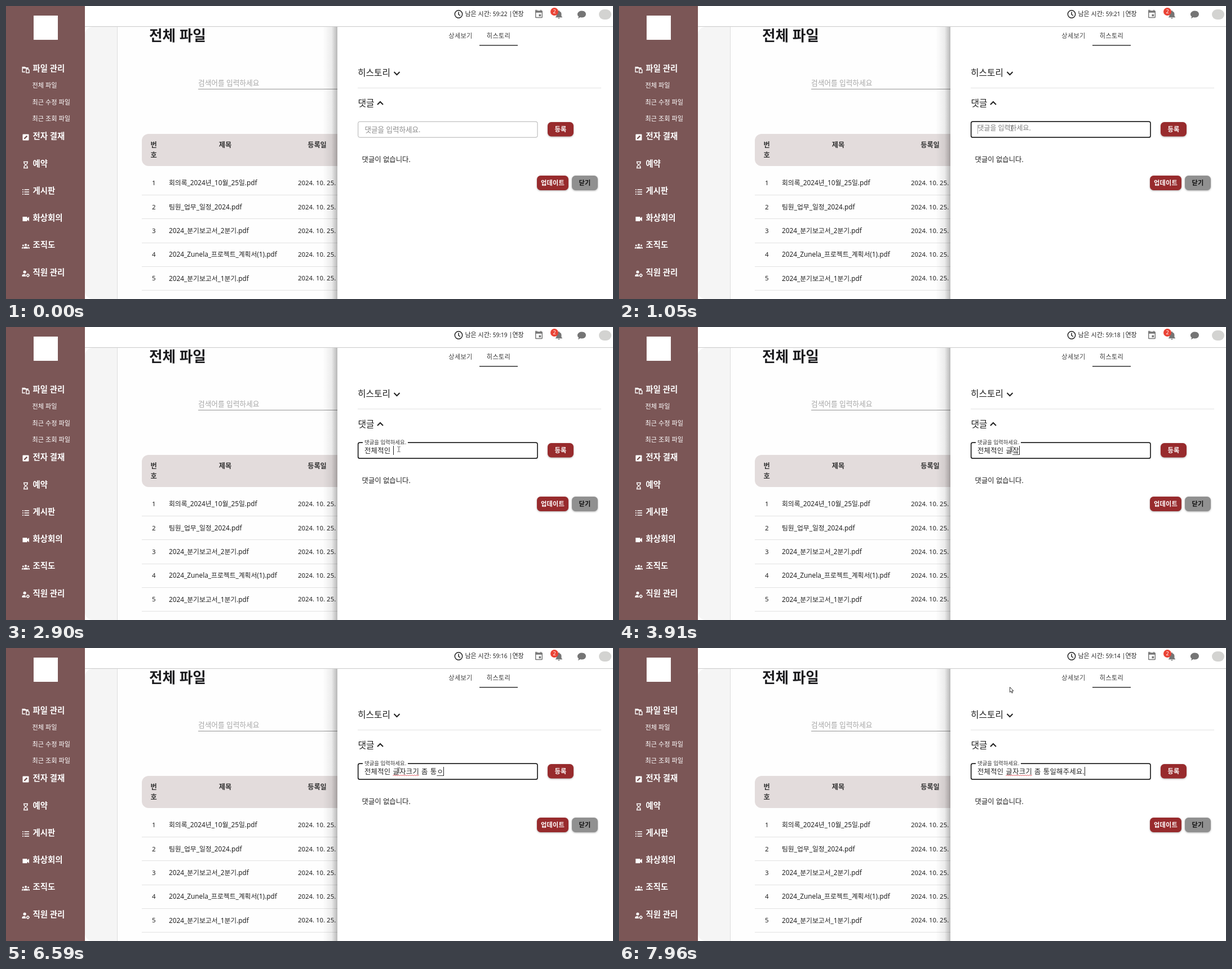
An HTML page with a canvas that plays this animation: 1077 px wide and 520 px high, repeating every 8 s.

```html
<!DOCTYPE html>
<html lang="ko">
<head>
<meta charset="utf-8">
<title>전체 파일</title>
<style>
html, body { margin: 0; width: 100%; height: 100%; overflow: hidden; background: #fff; }
canvas { display: block; }
</style>
</head>
<body>
<canvas id="stage" width="1077" height="520"></canvas>
<script>
const ctx = document.getElementById('stage').getContext('2d');
const LOOP = 8000;
const FAMILY = '"Noto Sans", "Noto Sans CJK KR", "Noto Sans CJK JP", sans-serif';
const BROWN = '#7b5656', RED = '#982b2d', INK = '#222', GREY = '#757575';

// y is the optical middle of the line
function text(str, x, y, size, { color = INK, weight = 400, align = 'left', gap = 0, word = 0 } = {}) {
  ctx.font = `${weight} ${size}px ${FAMILY}`;
  ctx.textAlign = align;
  ctx.letterSpacing = gap + 'px';
  ctx.wordSpacing = word + 'px';
  ctx.fillStyle = color;
  ctx.fillText(str, x, y + size * 0.37);
}

function box(x, y, w, h, color, radius = 0) {
  ctx.fillStyle = color;
  ctx.beginPath();
  ctx.roundRect(x, y, w, h, radius);
  ctx.fill();
}

function disc(x, y, r, color) {
  ctx.fillStyle = color;
  ctx.beginPath();
  ctx.arc(x, y, r, 0, Math.PI * 2);
  ctx.fill();
}

// Draws path data around a centre, filled and/or stroked
function shape(x, y, { fill, stroke, color = '#fff', width = 1.4, scale = 1 }) {
  ctx.save();
  ctx.translate(x, y);
  ctx.scale(scale, scale);
  ctx.fillStyle = ctx.strokeStyle = color;
  ctx.lineWidth = width;
  if (fill) ctx.fill(new Path2D(fill), 'evenodd');
  if (stroke) ctx.stroke(new Path2D(stroke));
  ctx.restore();
}

function latest(list, t) {
  let found = list[0];
  for (const item of list) if (item[0] <= t) found = item;
  return found;
}

const MENU = [['파일 관리', 111], ['전자 결재', 231], ['예약', 280], ['게시판', 328],
  ['화상회의', 376], ['조직도', 424], ['직원 관리', 473]];
const SUBMENU = [['전체 파일', 141], ['최근 수정 파일', 171], ['최근 조회 파일', 200]];
const FILES = ['회의록_2024년_10월_25일.pdf', '팀원_업무_일정_2024.pdf', '2024_분기보고서_2분기.pdf',
  '2024_Zunela_프로젝트_계획서(1).pdf', '2024_분기보고서_1분기.pdf'];

const MENU_ICONS = [
  { fill: 'M-5 -5H-1L0 -3.5H4V-2H-5Z', stroke: 'M-1 4H-5.8V-4.5H-1.5L-.3 -3H5M1 -1H4.5L6 .5V5.5H1Z' },
  { fill: 'M-4.5 -5.5H4.5Q5.5 -5.5 5.5 -4.5V4.5Q5.5 5.5 4.5 5.5H-4.5Q-5.5 5.5 -5.5 4.5V-4.5Q-5.5 -5.5 -4.5 -5.5ZM-3 3H-1.3L3.3 -1.6L1.6 -3.3L-3 1.3Z' },
  { stroke: 'M-4 -5.5H4M-4 5.5H4M-2.8 -5.5V-2.5L2.8 2.5V5.5M2.8 -5.5V-2.5L-2.8 2.5V5.5' },
  { stroke: 'M-6 -4H-4M-2.5 -4H6M-6 0H-4M-2.5 0H6M-6 4H-4M-2.5 4H6' },
  { fill: 'M-5.5 -4H2.5V-1.2L6 -4V4L2.5 1.2V4H-5.5Z' },
  { fill: 'M-2 -2A2 2 0 1 1 2 -2A2 2 0 1 1 -2 -2ZM-4 4.5V3Q-3.5 1 0 1Q3.5 1 4 3V4.5ZM-6 -1A1.4 1.4 0 1 1 -3.2 -1A1.4 1.4 0 1 1 -6 -1ZM3.2 -1A1.4 1.4 0 1 1 6 -1A1.4 1.4 0 1 1 3.2 -1ZM-7 4.5V3Q-6.8 1.6 -4.4 1.5L-4.8 4.5ZM7 4.5V3Q6.8 1.6 4.4 1.5L4.8 4.5Z' },
  { fill: 'M-4.5 -3A2.6 2.6 0 1 1 .7 -3A2.6 2.6 0 1 1 -4.5 -3ZM-6.5 5V3Q-6 .8 -1 .8Q-.4 3 .6 5Z',
    stroke: 'M1.8 3A2 2 0 1 1 5.8 3A2 2 0 1 1 1.8 3M3.8 -.2V1M3.8 5V6.2M.8 3H1.8M5.8 3H6.8' }
];

function drawSidebar() {
  box(0, 0, 140, 520, BROWN);
  box(49, 17, 43, 43, '#fff');
  MENU.forEach(([label, y], i) => {
    shape(35, y + 2, MENU_ICONS[i]);
    text(label, 47.5, y, 14.4, { color: '#fff', weight: 700 });
  });
  for (const [label, y] of SUBMENU) text(label, 46.5, y, 11.2, { color: '#fff' });
}

function drawTopBar(t) {
  box(140, 0, 937, 36, '#fff');
  box(140, 36, 937, 1, '#c9c9c9');
  shape(803, 14.5, { color: INK, width: 1.5, stroke: 'M-6.7 0A6.7 6.7 0 1 1 6.7 0A6.7 6.7 0 1 1 -6.7 0M0 -4V.5L3 2.5' });
  const ticks = [800, 1730, 2840, 3780, 4840, 5790, 6800, 7830];
  const left = 22 - ticks.filter(k => k <= t).length;
  text('남은 시간:', 814.5, 14, 11);
  text('59:' + left, 863.7, 14, 10.1);
  text('|', 892.5, 13.5, 10.5);
  text('연장', 898.5, 14, 11);

  shape(945.5, 14, { color: GREY, scale: 0.72,
    fill: 'M-7 -10H-9V-8V9Q-9 10 -7 10H7Q9 10 9 8V-6Q9 -8 7 -8H6V-10H4V-8H-4V-10H-6V-8H-7ZM-7 -3V8H7V-3ZM0 1H5V6H0Z' });
  shape(981, 15, { color: GREY, scale: 0.75,
    fill: 'M-2 8H2Q2 10 0 10Q-2 10 -2 8ZM-8 7V6L-6 4V-1Q-6 -6 -1.5 -7.3V-8A1.5 1.5 0 0 1 1.5 -8V-7.3Q6 -6 6 -1V4L8 6V7Z' });
  disc(973, 10, 7, '#ea4335');
  text('2', 973, 10, 9, { color: '#fff', align: 'center' });
  shape(1021.5, 15, { color: GREY, fill: 'M0 -6.5C10 -6.5 10 5.5 0 5.5Q-1.5 5.5 -2.8 5.1Q-4.5 6.7 -6.8 7Q-5.4 5.3 -5.4 3.8C-10 .5 -7 -6.5 0 -6.5Z' });
  box(1052, 6, 22, 18, '#d3d3d1', 9);
}

function drawFiles() {
  box(140, 37, 58, 483, '#f5f5f5', [14, 0, 0, 14]);
  box(197, 37, 391, 483, '#fefefe');
  box(197, 37, 1, 483, '#dedede');
  text('전체 파일', 254, 53, 25.6, { weight: 700, color: '#1c1c1f' });
  text('검색어를 입력하세요', 341, 136, 12.7, { color: '#a6a6a6' });
  box(341, 147, 247, 1, '#949494');

  box(241, 227, 380, 57, '#e3dcdc', 12);
  const head = { weight: 700, align: 'center', color: '#333' };
  text('번', 262, 246, 12.2, head);
  text('호', 262, 264, 12.2, head);
  text('제목', 389, 246, 12.2, head);
  text('등록일', 552, 246, 12.2, head);

  FILES.forEach((name, i) => {
    const y = 314 + i * 42.3;
    text(i + 1, 262.3, y, 11.5, { align: 'center' });
    text(name, 289, y, 11.8);
    text('2024. 10. 25.', 518, y, 11.4);
    box(241, Math.round(y + 21), 347, 1, '#e2e2e2');
  });
}

function button(x, y, w, h, color, label, ink) {
  ctx.save();
  ctx.shadowColor = 'rgba(0,0,0,.3)';
  ctx.shadowBlur = 3;
  ctx.shadowOffsetY = 1;
  box(x, y, w, h, color, 6.5);
  ctx.restore();
  text(label, x + w / 2, y + h / 2, 11.2, { color: ink, weight: 700, align: 'center', gap: 0.25 });
}

function chevron(x, y, dir) {
  shape(x, y, { color: INK, width: 2, stroke: `M-5 ${-2.5 * dir}L0 ${2.5 * dir}L5 ${-2.5 * dir}` });
}

function drawPanel() {
  const shade = ctx.createLinearGradient(562, 0, 588, 0);
  shade.addColorStop(0, 'rgba(0,0,0,0)');
  shade.addColorStop(0.6, 'rgba(0,0,0,.07)');
  shade.addColorStop(1, 'rgba(0,0,0,.28)');
  box(562, 37, 26, 483, shade);
  box(588, 37, 489, 483, '#fff');

  text('상세보기', 806.5, 53, 11.2, { align: 'center', gap: 0.3, color: '#444' });
  text('히스토리', 874, 53, 11.2, { align: 'center', gap: 0.3, color: '#333' });
  box(840, 69, 68, 1.5, '#333');
  text('히스토리', 624, 118, 15.8);
  chevron(693.5, 119.5, 1);
  box(624, 145, 432, 1, '#e2e2e2');
  text('댓글', 624.5, 172, 15.8);
  chevron(664, 172.5, -1);
  text('댓글이 없습니다.', 631.5, 272, 12.4);
  button(961, 206, 46, 25.5, RED, '등록', '#fff');
  button(942, 301, 56, 26, RED, '업데이트', '#fff');
  button(1004, 301, 46, 26, '#909090', '닫기', '#111');
}

const COMMENT = '전체적인 글자크기 좀 통일해주세요.';
// time, committed letters, syllable being composed
const KEYS = [
  [0, 0, ''], [1690, 0, 'ㅈ'], [1800, 0, '저'], [2000, 0, '전'],
  [2280, 1, 'ㅊ'], [2350, 1, '체'], [2420, 1, '쳊'], [2490, 2, '저'], [2560, 2, '적'],
  [2660, 3, 'ㅇ'], [2740, 3, '이'], [2820, 3, '인'], [2900, 5, ''],
  [2970, 5, 'ㄱ'], [3040, 5, '그'], [3120, 5, '글'],
  [3520, 6, 'ㅈ'], [3780, 6, '자'], [3910, 6, '잨'], [4460, 6, ''], [4570, 6, 'ㅈ'],
  [4840, 6, '자'], [4910, 7, '크'], [4980, 7, '큭'], [5020, 8, '기'], [5060, 10, ''],
  [5130, 10, 'ㅈ'], [5230, 10, '조'], [5400, 10, '좀'], [5520, 12, ''],
  [5990, 12, 'ㅌ'], [6250, 12, '토'], [6390, 12, '통'],
  [6590, 13, 'ㅇ'], [6660, 13, '이'], [6730, 13, '일'], [6800, 13, '잃'], [6870, 14, '해'],
  [6940, 14, '핮'], [7010, 15, '주'], [7080, 15, '줏'], [7150, 16, '세'], [7220, 16, '셍'],
  [7360, 17, '요'], [7560, 19, '']
];
// time, label progress, right end of the border gap
const LABEL = [[0, 0, 0], [1050, 0.18, 0], [1120, 0.8, 650], [1190, 0.97, 692], [1330, 1, 713]];
const TYPED = { gap: 0.3, word: 0.6 }, TYPED_SIZE = 12.3, TYPED_X = 636;

function typedWidth(str) {
  ctx.font = `400 ${TYPED_SIZE}px ${FAMILY}`;
  ctx.letterSpacing = TYPED.gap + 'px';
  ctx.wordSpacing = TYPED.word + 'px';
  return ctx.measureText(str).width;
}

function squiggle(x0, x1, y) {
  ctx.beginPath();
  for (let x = x0, up = 0; x <= x1; x += 2, up ^= 1) ctx.lineTo(x, y - up * 2);
  ctx.strokeStyle = '#e0464e';
  ctx.lineWidth = 1;
  ctx.stroke();
}

function drawField(t, hover) {
  const focused = t >= 980;
  ctx.strokeStyle = focused || hover ? INK : '#b0b0b0';
  ctx.lineWidth = focused ? 1.7 : 1;
  ctx.beginPath();
  ctx.roundRect(624.7, 205.2, 318.3, 28, 3);
  ctx.stroke();

  const [, p, gapEnd] = latest(LABEL, t);
  if (gapEnd) box(633, 203, gapEnd - 633, 4, '#fff');
  const tone = Math.round(140 - 85 * p);
  text('댓글을 입력하세요.', 636.5 - 0.5 * p, 219 - 14 * p, 12.55 * (1 - 0.25 * p), { color: `rgb(${tone},${tone},${tone})` });

  const [, count, composing] = latest(KEYS, t);
  const done = COMMENT.slice(0, count);
  text(done + composing, TYPED_X, 219, TYPED_SIZE, TYPED);
  const start = TYPED_X + typedWidth(done);
  const end = TYPED_X + typedWidth(done + composing);
  if (composing) box(start, 226, end - start, 1, '#444');
  if (count >= 10) {
    squiggle(TYPED_X + typedWidth(COMMENT.slice(0, 5)), TYPED_X + typedWidth(COMMENT.slice(0, 9)), 227);
  }
  const blinkOff = t >= 1530 && t < 1690;
  if (focused && !blinkOff) box(Math.round(end), 211, 1, 16, count || composing ? INK : '#aaa');
}

// Pointer enters from below, rests on the field, leaves upward at the end
function pointerAt(t) {
  if (t < 120) return null;
  if (t >= 7960) return [693, 69];
  if (t >= 7830) return [695, 140];
  const step = Math.min(12, Math.floor((t - 120) / 65.8));
  const u = 1 - (1 - step / 12) ** 1.6, v = 1 - u;
  return [v * v * 1040 + 2 * u * v * 1030 + u * u * 697, v * v * 512 + 2 * u * v * 270 + u * u * 217];
}

function overField([x, y]) {
  return x > 624 && x < 943 && y > 205 && y < 234;
}

function drawPointer(at) {
  const [x, y] = at;
  if (overField(at)) {
    shape(x, y, { color: '#555', width: 1, stroke: 'M-2.5 -4.5H-.5M.5 -4.5H2.5M0 -4V4M-2.5 4.5H-.5M.5 4.5H2.5' });
    return;
  }
  const arrow = 'M.5 .5V9.5L2.6 7.6L4.1 11L5.6 10.3L4.1 7.1H7Z';
  shape(x, y, { fill: arrow });
  shape(x, y, { stroke: arrow, color: INK, width: 0.9 });
}

function frame(now) {
  const t = now % LOOP;
  const pointer = pointerAt(t);
  box(0, 0, 1077, 520, '#fff');
  drawFiles();
  drawPanel();
  drawField(t, pointer && overField(pointer));
  drawSidebar();
  drawTopBar(t);
  if (pointer) drawPointer(pointer);
  requestAnimationFrame(frame);
}
requestAnimationFrame(frame);
</script>
</body>
</html>
```
